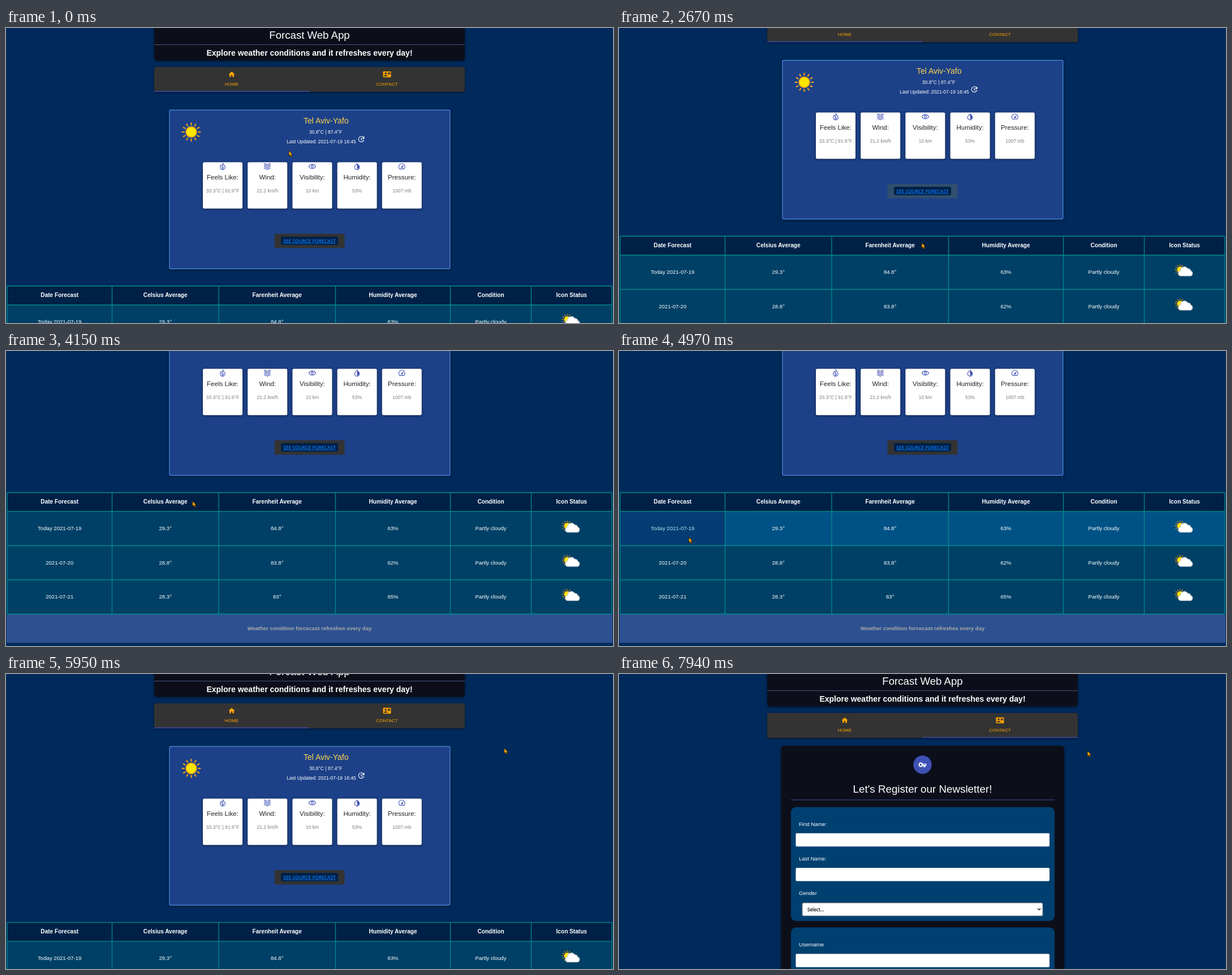
Recreate the animation shown at these times as an HTML page. Size 1073 px wide and 522 px high, loop 8000 ms.

```html
<!DOCTYPE html>
<html lang="en">
<head>
<meta charset="utf-8">
<title>Forecast web app</title>
<style>
html, body { margin: 0; width: 100%; height: 100%; overflow: hidden; background: #002a5c; }
svg { display: block; width: 1073px; height: 522px; font-family: "Liberation Sans", Arial, sans-serif; }
.ui { font-family: "Open Sans", sans-serif; font-weight: 600; }
.bold { font-weight: bold; }
.start { text-anchor: start; }
.link { text-decoration: underline; letter-spacing: .25px; }
.shadow { filter: drop-shadow(0 1px 2px #0008); }
.line { fill: none; stroke: currentColor; stroke-width: 2; }
</style>
</head>
<body>
<svg id="stage" viewBox="0 0 1073 522" text-anchor="middle"></svg>
<script>
const text = (x, middle, size, fill, label, cls = '', extra = '') =>
  `<text x="${x}" y="${middle + size * .36}" font-size="${size}" fill="${fill}" class="${cls}" ${extra}>${label}</text>`;
const rect = (x, y, w, h, fill, r = 0, extra = '') =>
  `<rect x="${x}" y="${y}" width="${w}" height="${h}" rx="${r}" fill="${fill}" ${extra}/>`;
const icon = (x, y, size, color, body) =>
  `<g transform="translate(${x - size / 2} ${y - size / 2}) scale(${size / 24})" fill="${color}" color="${color}">${body}</g>`;
const line = d => `<path class="line" d="${d}"/>`;

const icons = {
  home: '<path d="M10 20v-6h4v6h5v-8h3L12 3 2 12h3v8z"/>',
  contact: `<path fill-rule="evenodd" d="M2 3H22Q24 3 24 5V19Q24 21 22 21H2Q0 21 0 19V5Q0 3 2 3zM14 6V12H22V6zM2 18H14V17C14 13 2 13 2 17zM8 6a3 3 0 1 0 .01 0z"/>
    <path d="M15 7l3 2 3-2v1l-3 2-3-2z"/>`,
  update: line('M20 7A9 9 0 1 0 21 13M12 7V13L16 15') + '<path d="M22 2V10H14z"/>',
  flame: line('M13 2C14 7 20 9 20 15A8 7.5 0 0 1 4 15C4 11 6 9 7 7 8 10 10 11 11 10 13 8 12 5 13 2z') +
    line('M12 13C8 15 9 20 12 20 16 20 16 16 12 13z'),
  waves: [5, 10, 15, 20].map(y => line(`M1 ${y}q3.5-4 7 0t7 0 7 0`)).join(''),
  eye: line('M1 12C5 3 19 3 23 12 19 21 5 21 1 12z') + line('M12 8.5a3.5 3.5 0 1 0 .01 0z'),
  drop: line('M12 3L6.5 8.5A8 8 0 1 0 17.5 8.5z') + '<path d="M12 3V21A8 8 0 0 0 17.5 8.5z"/>',
  gauge: line('M5 20A10 10 0 1 1 19 20z') + '<path d="M18 7L14 16A2.5 2.5 0 1 1 10 13z"/>',
  key: '<path fill-rule="evenodd" d="M13 9H23V15H20V19H15V15H13A6.5 6.5 0 1 1 13 9zM7 9a3 3 0 1 0 .01 0z"/>' +
    '<path d="M14 12H21" stroke="#3f51b5" stroke-width="1.5"/>'
};

const rays = (count, inner, outer, width) => Array.from({ length: count }, (_, i) =>
  `<path d="M0 ${-inner}V${-outer}" stroke="#f2a516" stroke-width="${width}" transform="rotate(${i * 360 / count})"/>`).join('');
const sun = (x, y, r) => `<g transform="translate(${x} ${y})">${rays(12, r * 1.28, r * 1.8, r * .23)}
  <circle r="${r}" fill="#ffe600" stroke="#f2a516" stroke-width="${r * .2}"/></g>`;
const partlyCloudy = y => sun(992, y - 4.5, 5.2) +
  `<path transform="translate(988 ${y - 10})" d="M5 16.5A4.6 4.6 0 0 1 4.5 7.5 6.8 6.8 0 0 1 17 4 5 5 0 0 1 22.5 8 4.4 4.4 0 0 1 22 16.5z" fill="#fff" stroke="#d4d8dc" stroke-width="1.5"/>`;

const cards = [
  ['Feels Like:', '33.3°C | 91.9°F', 'flame'],
  ['Wind:', '21.2 km/h', 'waves'],
  ['Visibility:', '10 km', 'eye'],
  ['Humidity:', '53%', 'drop'],
  ['Pressure:', '1007 mb', 'gauge']
];
const cardX = i => 348 + i * 79.2;
const columns = [2, 187.5, 376, 582.5, 785.5, 928.5, 1071];
const titles = ['Date Forecast', 'Celsius Average', 'Farenheit Average', 'Humidity Average', 'Condition', 'Icon Status'];
const rows = [
  ['Today 2021-07-19', '29.3°', '84.8°', '63%', 'Partly cloudy'],
  ['2021-07-20', '28.8°', '83.8°', '62%', 'Partly cloudy'],
  ['2021-07-21', '28.3°', '83°', '65%', 'Partly cloudy']
];
const rowY = i => 490 + i * 60.5;
const center = c => (columns[c] + columns[c + 1]) / 2;

const header = () => rect(262, -20, 549, 77.5, '#0c0f1a', 5, 'class="shadow"') +
  text(536.5, 12, 18.6, '#fff', 'Forcast Web App') +
  rect(262, 29, 549, 1, '#46557f') +
  text(536.5, 44, 14, '#fff', 'Explore weather conditions and it refreshes every day!', 'bold') +
  rect(262, 69, 549, 44, '#333', 3, 'class="shadow"') +
  icon(399, 82, 13.5, '#ffa500', icons.home) + text(399, 99.5, 8.1, '#ffa500', 'HOME') +
  icon(673.5, 82, 14, '#ffa500', icons.contact) + text(673.5, 99.5, 8.1, '#ffa500', 'CONTACT') +
  rect(262, 111.7, 274.5, 1.3, '#3f51b5', 0, 'id="indicator"');

const card = ([title, value, name], i) => {
  const x = cardX(i), mid = x + 35;
  return `<g class="card">${rect(x, 237.5, 70, 82, '#fff', 2.5, 'class="shadow"')}
    ${icon(mid, 245, 13, '#3f51b5', icons[name])}
    ${text(mid, 264, 11.6, '#212121', title)}${text(mid, 287.5, 8.55, '#7d7d7d', value)}</g>`;
};

const row = (cells, i) => `<g class="row">${rect(2, rowY(i), 1069, 60.5, '#004066')}
  ${rect(0, rowY(i), 0, 60.5, '#101450', 0, 'opacity=".35"')}
  ${cells.map((label, c) => text(center(c), rowY(i) + 30, 9.6, '#fff', label)).join('')}
  ${partlyCloudy(rowY(i) + 30)}</g>`;

const home = () => rect(288.9, 145.1, 496, 281, '#1d4188', 2.5, 'stroke="#4a94e8" stroke-width="1.2" class="shadow"') +
  sun(327.5, 184, 9.3) +
  text(565.7, 164, 14, '#ffd54f', 'Tel Aviv-Yafo') +
  text(565, 184, 8.5, '#fff', '30.8°C | 87.4°F') +
  text(557.5, 201, 8.5, '#fff', 'Last Updated: 2021-07-19 16:45') +
  icon(628, 197, 13, '#fff', icons.update) +
  cards.map(card).join('') +
  rect(474.5, 364, 124, 25.5, '#333', 2, 'id="button"') +
  rect(486, 369, 101, 15, '#002147', 3) +
  text(536.6, 376.8, 8, '#0a7cff', 'SEE SOURCE FORECAST', 'ui link') +
  rect(2, 456.5, 1069, 33.5, '#002147') +
  titles.map((title, c) => text(center(c), 472.7, 10.1, '#fff', title, 'bold')).join('') +
  rows.map(row).join('') +
  rect(1, 671.5, 1071, 51, '#2d5190', 2) +
  text(536.5, 696.7, 9.5, '#a9a9a9', 'Weather condition forcecast refreshes every day', 'bold') +
  `<path fill="none" stroke="#008b8b" stroke-width="1.3" d="M2 456.5H1071M${[0, 1, 2, 3].map(i => `2 ${rowY(i)}H1071`).join('M')}${columns.map(x => `M${x} 456.5V671.5`).join('')}"/>`;

const field = (label, y) => text(318, y, 9.55, '#fff', label, 'start') + rect(312.5, y + 16.5, 448.5, 23.5, '#fff', 2);
const form = () => rect(286.5, 127, 500.5, 500, '#0c0f1a', 6, 'class="shadow"') +
  '<circle cx="536.5" cy="160.5" r="16.2" fill="#3f51b5"/>' + icon(536.5, 160.5, 15, '#fff', icons.key) +
  text(536.5, 203, 18.8, '#fff', "Let's Register our Newsletter!") +
  rect(304, 222.3, 466, 1, '#3f4f9d') +
  rect(304, 235.5, 466, 201.5, '#004070', 9) +
  field('First Name:', 265.3) + field('Last Name:', 326.6) +
  text(318, 387.7, 9.55, '#fff', 'Gender', 'start') +
  rect(324, 405, 425, 23, '#fff', 2, 'stroke="#767676"') +
  text(333, 416.7, 8, '#000', 'Select...', 'ui start') +
  '<path class="line" style="stroke-width:1.2" d="M740 415l2.5 2.5 2.5-2.5"/>' +
  rect(304, 448.5, 466, 200, '#004070', 9) + field('Username', 478.7);

const stage = document.getElementById('stage');
stage.innerHTML = `<g id="page">${header()}<g id="home">${home()}</g><g id="form">${form()}</g></g>
  <g id="cursor"><path id="arrow" d="M0 0V9.5L2.3 7.6 4 11 5.8 10.1 4.2 6.9H7z" fill="#ffa500" stroke="#151515" stroke-width=".9"/>
  <g id="beam" fill="none"><path d="M-3-5H3M0-5V5M-3 5H3" stroke="#151515" stroke-width="2.4"/><path d="M0-4V4" stroke="#b97a10" stroke-width=".8"/></g></g>`;
const part = id => document.getElementById(id);
const cardNodes = [...document.querySelectorAll('.card')];
const rowNodes = [...document.querySelectorAll('.row')];

// Pointer route: time, x, y
const route = [
  [0, 500, 217], [110, 500, 216], [400, 500, 216], [600, 545, 275], [780, 700, 290], [900, 771, 320],
  [1000, 760, 336], [1170, 715, 315], [1260, 660, 285], [1440, 520, 290], [1590, 380, 285], [1720, 510, 268],
  [1800, 560, 262], [1980, 548, 328], [2160, 535, 380], [2900, 535, 380], [3020, 500, 343], [3340, 473, 331],
  [3470, 450, 268], [3700, 420, 440], [4150, 330, 265], [4520, 200, 440], [4610, 150, 435], [4860, 126, 343],
  [4970, 123, 330], [5150, 170, 262], [5330, 350, 150], [5950, 881, 131], [6160, 795, 150], [6250, 750, 105],
  [6600, 396, 90], [6970, 606, 95], [7060, 636, 95], [7480, 636, 95], [7940, 828, 136], [8000, 828, 136]
];
const CLICK = 7600;
const clamp = v => Math.min(1, Math.max(0, v));
const progress = (t, from, to) => clamp((t - from) / (to - from));
const ease = p => p < .5 ? 2 * p * p : 1 - 2 * (1 - p) ** 2;
const mix = (a, b, p) => `rgb(${a.map((v, i) => Math.round(v + (b[i] - v) * p))})`;
const scroll = t => 206 * (ease(progress(t, 2500, 2870)) - ease(progress(t, 5680, 6020)));

function pointer(t) {
  const i = Math.max(1, route.findIndex(p => p[0] > t));
  const [from, to] = [route[i - 1], route[i]], p = progress(t, from[0], to[0]);
  return [1, 2].map(k => from[k] + (to[k] - from[k]) * p);
}
function over(t, x, y, w, h) {
  if (t < 0) return false;
  const [px, py] = pointer(t), top = y - scroll(t);
  return px >= x && px < x + w && py >= top && py < top + h;
}
// Share of a duration for which the box has been continuously in the given hover state
function held(t, duration, box, state = true) {
  let age = 0;
  while (age < duration && over(t - age, ...box) === state) age += 5;
  return clamp(age / duration);
}

function render(t) {
  const [x, y] = pointer(t), contact = t >= CLICK;
  part('page').setAttribute('transform', `translate(0 ${-scroll(t)})`);
  part('home').style.display = contact ? 'none' : '';
  part('form').style.display = contact ? '' : 'none';
  part('indicator').setAttribute('x', 262 + 274.5 * ease(progress(t, CLICK, CLICK + 300)));

  let typing = false;
  cardNodes.forEach((node, i) => {
    const box = [cardX(i), 237.5, 70, 82], level = held(t, 60, box);
    node.children[0].setAttribute('fill', mix([255, 255, 255], [215, 240, 243], level));
    node.children[2].setAttribute('fill', mix([33, 33, 33], [75, 88, 95], level));
    typing ||= !contact && over(t, cardX(i) + 8, 257, 54, 13);
  });

  const button = [474.5, 364, 124, 25.5];
  const glow = over(t, ...button) ? held(t, 250, button) : 1 - held(t, 250, button, false);
  part('button').setAttribute('fill', mix([51, 51, 51], [45, 101, 160], glow));

  rowNodes.forEach((node, i) => {
    const level = held(t, 300, [2, rowY(i), 1069, 60.5]);
    const column = level ? columns.findIndex((left, c) => x >= left && x < columns[c + 1]) : -1;
    const [back, shade, ...labels] = node.children;
    back.setAttribute('fill', mix([0, 64, 102], [0, 110, 183], level));
    shade.setAttribute('x', columns[column] ?? 0);
    shade.setAttribute('width', column < 0 ? 0 : columns[column + 1] - columns[column]);
    labels.slice(0, 5).forEach((label, c) => {
      label.setAttribute('fill', c === column ? '#b4e8ee' : '#fff');
      label.setAttribute('font-weight', c === column && level > .5 ? 'bold' : 'normal');
    });
  });

  part('cursor').setAttribute('transform', `translate(${x} ${y})`);
  part('arrow').style.display = typing ? 'none' : '';
  part('beam').style.display = typing ? '' : 'none';
}

const start = performance.now();
function tick() {
  render((performance.now() - start) % 8000);
  requestAnimationFrame(tick);
}
tick();
</script>
</body>
</html>
```
